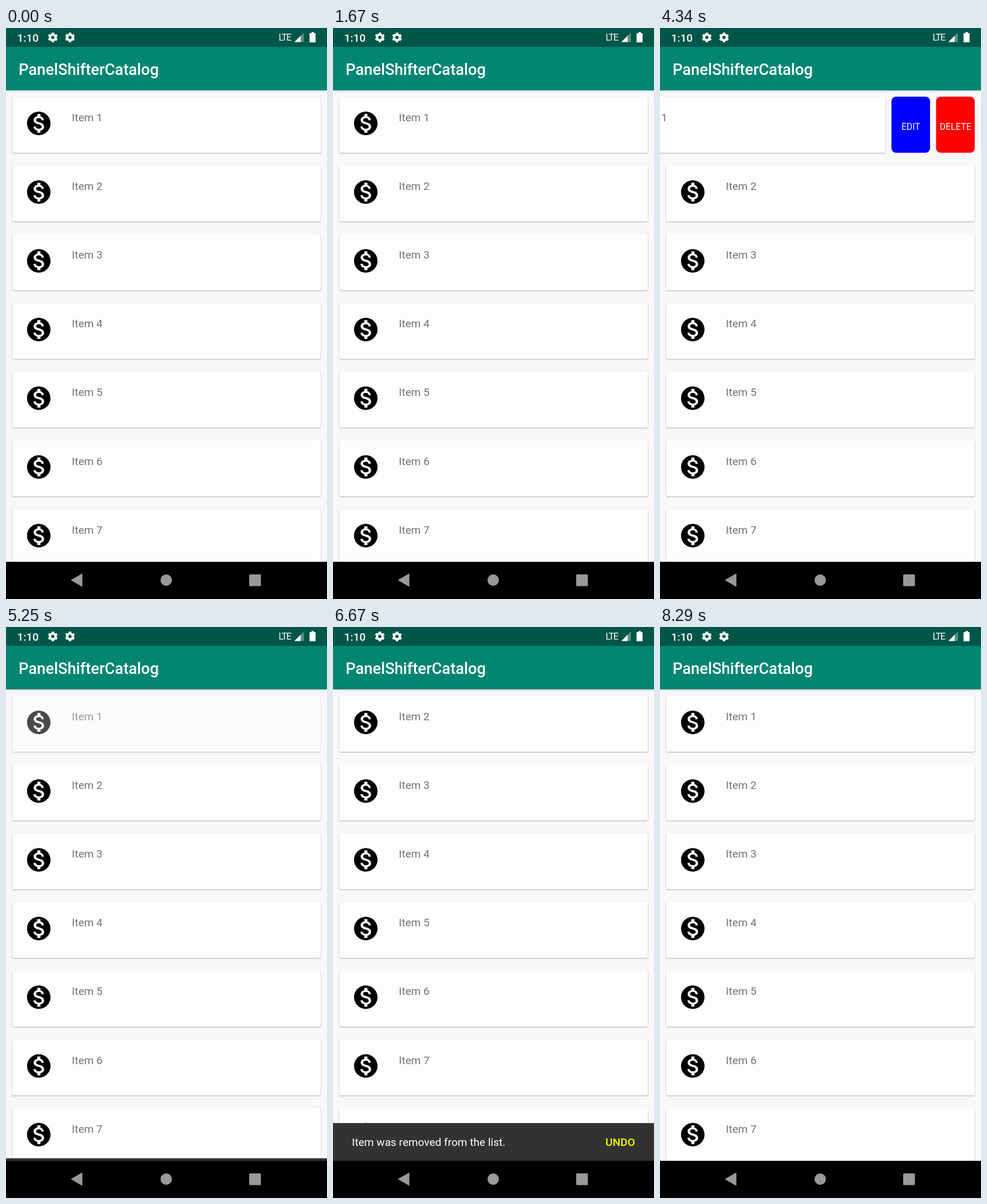
Animation, 561 px wide and 998 px high, one loop 8420 ms. Source, as an HTML page:

```html
<!DOCTYPE html>
<html lang="en">
<head>
<meta charset="utf-8">
<title>Swipe list</title>
<style>
  html, body { margin: 0; width: 100%; height: 100%; overflow: hidden; background: #f8f8fb; }
  svg { display: block; width: 100%; height: 100%; font: 19.1px Roboto, sans-serif; }
  .medium { font-weight: 500; }
  .card rect { fill: #fdfdfe; filter: drop-shadow(0 1px 1.3px rgba(0, 0, 0, .3)); }
  .card text { fill: #737373; }
  #bar { filter: drop-shadow(0 1px 2px rgba(0, 0, 0, .2)); }
  .white { fill: #fff; }
  .label { font-size: 15.8px; text-anchor: middle; fill: #fff; }
</style>
</head>
<body>
<svg viewBox="0 0 561 998">
  <defs>
    <path id="coin" d="M12 2C6.48 2 2 6.48 2 12s4.48 10 10 10 10-4.48 10-10S17.52 2 12 2zm1.41 16.09V20h-2.67v-1.93c-1.71-.36-3.16-1.46-3.27-3.4h1.96c.1 1.05.82 1.87 2.65 1.87 1.96 0 2.4-.98 2.4-1.59 0-.83-.44-1.61-2.67-2.14-2.48-.6-4.18-1.62-4.18-3.67 0-1.72 1.39-2.84 3.11-3.21V4h2.67v1.95c1.86.45 2.79 1.86 2.85 3.39H14.3c-.05-1.11-.64-1.87-2.22-1.87-1.5 0-2.4.68-2.4 1.64 0 .84.65 1.39 2.67 1.91s4.18 1.39 4.18 3.91c-.02 1.83-1.38 2.83-3.12 3.16z"/>
    <g id="gear" fill="none" stroke="#fff" transform="rotate(14.3)">
      <circle r="4.9" stroke-width="4"/>
      <circle r="7.3" stroke-width="2.6" stroke-dasharray="4 3.645"/>
    </g>
  </defs>
  <rect width="561" height="998" fill="#f8f8fb"/>

  <g id="actions">
    <rect x="404.5" y="120" width="67.5" height="98" rx="8" fill="#00f"/>
    <rect x="482.5" y="120" width="67.5" height="98" rx="8" fill="#f00"/>
    <text class="label" x="438.3" y="177.5">EDIT</text>
    <text class="label" x="516.5" y="177.5">DELETE</text>
  </g>

  <g id="list"></g>

  <rect id="bar" width="561" height="109" fill="#008573"/>
  <rect width="561" height="33" fill="#005649"/>
  <text class="white medium" x="22" y="81.5" font-size="27.3">PanelShifterCatalog</text>
  <text class="white medium" x="19.5" y="24">1:10</text>
  <use href="#gear" x="0" y="0" transform="translate(81.8 16.5)"/>
  <use href="#gear" x="0" y="0" transform="translate(111.8 16.5)"/>
  <text class="white" x="476.5" y="22" font-size="16" letter-spacing="-1.3">LTE</text>
  <path class="white" opacity=".35" d="M504 24.500h16.500V8z"/>
  <path class="white" d="M504 24.500h11V13.500z"/>
  <path class="white" d="M534 7h4v2h3v16h-10.500V9h3.500z"/>

  <g id="snack">
    <rect y="867" width="561" height="67" fill="#323230"/>
    <g id="message">
      <text class="white" x="33" y="907">Item was removed from the list.</text>
      <text class="medium" x="528" y="907" text-anchor="end" fill="#ff0">UNDO</text>
    </g>
  </g>

  <rect y="933" width="561" height="65"/>
  <g fill="#999">
    <path d="M114 965l19-11v22z" stroke="#999" stroke-linejoin="round"/>
    <circle cx="280" cy="965" r="10"/>
    <rect x="425" y="955" width="20.500" height="20.500" rx="1.500"/>
  </g>
</svg>
<script>
const LOOP = 8420, PITCH = 120.1, OPEN = -156;
const REMOVE = 5215, UNDO = 6980;
const $ = id => document.getElementById(id);

const progress = (t, start, length) => Math.min(1, Math.max(0, (t - start) / length));
const smooth = p => .5 - .5 * Math.cos(Math.PI * p);

// cubic-bezier(.4, 0, .2, 1)
function glide(x) {
  let lo = 0, hi = 1, s = .5;
  for (let i = 0; i < 20; i++) {
    s = (lo + hi) / 2;
    const bx = 1.2 * s * (1 - s) ** 2 + .6 * s * s * (1 - s) + s ** 3;
    if (bx < x) lo = s; else hi = s;
  }
  return 3 * s * s * (1 - s) + s ** 3;
}

$('list').innerHTML = Array.from({ length: 8 }, (_, i) => `
  <g class="card">
    <rect x="11" y="120" width="539" height="98" rx="2.5"/>
    <use href="#coin" transform="translate(32.7 142.1) scale(2.05)"/>
    <text x="115" y="163">Item ${i + 1}</text>
  </g>`).join('');
const cards = [...$('list').children];

// Drag past the buttons, then settle beside them until the row is removed.
function swipe(t) {
  if (t >= REMOVE) return 0;
  const drag = -215 * smooth(progress(t, 3690, 420));
  return drag + (OPEN + 215) * smooth(progress(t, 4130, 190));
}

function draw(t) {
  const dx = swipe(t);
  const lift = smooth(progress(t, REMOVE + 120, 250)) - smooth(progress(t, UNDO + 6, 250));
  cards.forEach((card, i) => {
    const x = i ? 0 : dx, y = i ? (i - lift) * PITCH : 0;
    card.setAttribute('transform', `translate(${x} ${y})`);
  });
  cards[0].setAttribute('opacity', 1 - progress(t, REMOVE, 120) + progress(t, UNDO + 256, 120));
  $('actions').style.display = dx ? '' : 'none';

  const shown = glide(progress(t, REMOVE - 5, 250)) - glide(progress(t, UNDO - 10, 250));
  $('snack').setAttribute('transform', `translate(0 ${67 * (1 - shown)})`);
  $('message').setAttribute('opacity', progress(t, REMOVE + 65, 180) - progress(t, UNDO - 10, 180));
}

function tick() {
  draw(performance.now() % LOOP);
  requestAnimationFrame(tick);
}
tick();
</script>
</body>
</html>
```
